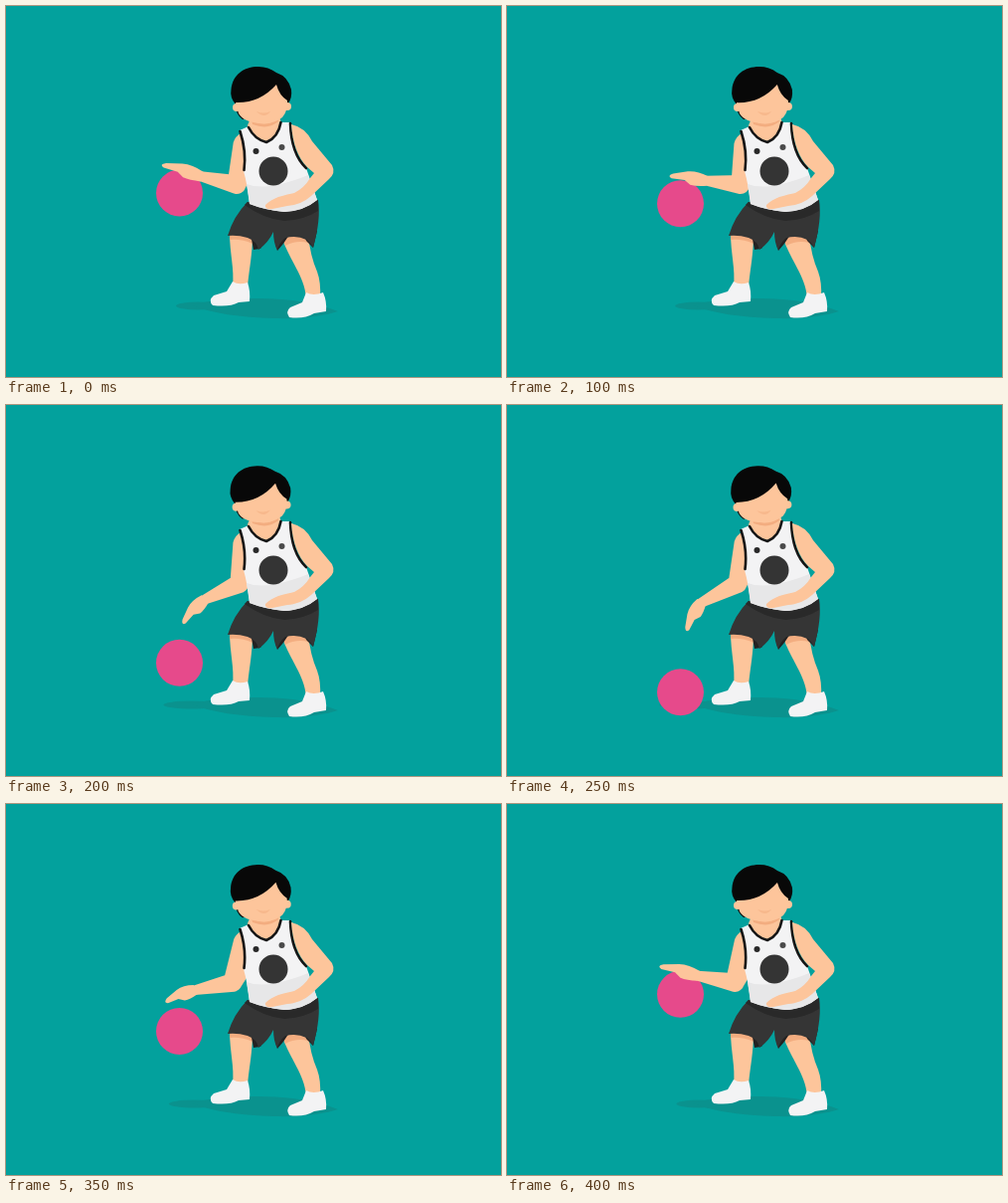
An HTML page that plays this animation: 498 px wide and 373 px high, repeating every 450 ms.

```html
<!DOCTYPE html>
<html lang="en">
<head>
<meta charset="utf-8">
<title>Dribbling player</title>
<style>
  html, body { margin: 0; width: 100%; height: 100%; overflow: hidden; background: #03a19d; }
  svg { display: block; width: 100%; height: 100%; }
  .skin { fill: #fdc59b; }
  .shade { fill: #f3ad80; }
  .shoe { fill: #f3f3f4; }
  .trim { fill: none; stroke: #151515; stroke-width: 2.6; stroke-linecap: round; }
</style>
</head>
<body>
<svg viewBox="0 0 498 373">
  <g fill="#0a928e">
    <ellipse id="ballShadow" cy="301.5" ry="4"/>
    <path d="M187 301C205 295 228 294 254 294C286 294 315 299 334 307C322 311 299 315 270 314C235 313 207 309 187 301Z"/>
  </g>

  <circle id="ball" cx="174.5" r="23.5" fill="#e64a8b"/>
  <path id="arm" class="skin"/>
  <path id="hand" class="skin" d="M-2 5Q9 9 18 7L32 3Q38 0 33 -2L20 -2L14 -6Q8 -7 -2 -5Z"/>

  <g id="legs">
    <path class="skin" d="M225 228L248 230C248 249 245 262 243 282H228C230 264 225 249 225 228Z"/>
    <path class="skin" d="M278 234L304 230Q306 251 313 267Q317 278 316 293H302C300 271 286 257 278 234Z"/>
    <path class="shade" d="M225 229L248 233V239Q237 234 225 235Z"/>
    <path class="shade" d="M278 233L302 229L304 238Q292 235 281 241Z"/>
    <path class="shoe" d="M228 277Q234 281 243 278Q246 286 245 297L234 298Q225 303 208 301Q203 296 209 291L222 287Z"/>
    <path class="shoe" d="M302 288Q309 292 319 288Q323 297 322 307L310 309Q300 315 285 313Q281 307 286 303L298 298Z"/>
  </g>

  <g id="shorts">
    <path fill="#222" d="M245 224L270 222L256 244L249 245ZM270 222L285 230L279 239L273 246ZM298 226H313L309 243L302 236Z"/>
    <path fill="#353535" d="M243 197L314 195Q317 214 309 243Q302 229 281 233Q274 239 273 246Q269 238 269 227Q264 238 254 245Q252 236 243 233Q233 230 223 231Q229 211 243 197Z"/>
    <path fill="#292929" d="M243 197L314 195V206Q300 215 280 216Q259 214 240 200Z"/>
  </g>

  <path class="skin" d="M243 120L248 108H274L277 118Q273 133 262 136Q249 133 243 122Z"/>
  <path class="shade" d="M247 115Q261 123 274 113V116Q264 125 248 119Z"/>

  <path fill="#f3f3f4" d="M235 125L244 121Q250 134 262 137Q274 132 276 117L285 117Q288 148 302 163L313 195Q300 206 280 207Q260 205 245 199Q243 180 239 166Q242 145 235 125Z"/>
  <path fill="#e7e7e8" d="M242 179Q262 187 304 170L313 195Q300 206 280 207Q260 205 245 199Z"/>
  <path class="trim" d="M235.500 126Q242 146 239.500 165M286 118Q287 149 302 163"/>
  <path class="trim" d="M244 122Q250 134 262 137Q274 132 276.500 117"/>
  <circle cx="269" cy="166" r="14.500" fill="#343434"/>
  <circle cx="251.500" cy="146" r="3" fill="#292929"/>
  <circle cx="277.500" cy="142" r="3" fill="#4a4a4a"/>

  <path class="skin" d="M287 119Q301 122 308 136L328 160Q332 168 325 174L307 191Q297 200 283 201L268 204Q260 205 261 200Q266 195 274 192Q284 189 290 188Q300 183 306 173L310 168L303 162Q289 148 287 119Z"/>

  <g id="head">
    <path fill="#080808" d="M238 114Q231 109 231 99Q225 92 226.500 84C228 69 239 61 254 61Q264 61 272 67Q284 71 287 84Q288 92 284 98L276 106Z"/>
    <circle class="skin" cx="232" cy="102" r="4"/>
    <circle class="skin" cx="283" cy="101" r="4"/>
    <path class="skin" d="M231 97Q255 98 272 79Q275 90 283 95Q284 105 278 112Q269 119 257 118Q239 117 234 108Z"/>
    <path class="shade" opacity=".55" d="M252 106Q259 109 266 106Q260 114 252 106Z"/>
  </g>
</svg>
<script>
  const get = id => document.getElementById(id);
  const [ball, shadow, arm, hand, head] = ['ball', 'ballShadow', 'arm', 'hand', 'head'].map(get);

  const HOLD = 100, STEP = 50, LOOP = 450, POSES = 8;
  const SHOULDER = [244, 142];
  const SHADOW_RIGHT = 215;

  // Limb segment: two discs joined by straight sides
  function taper([ax, ay], ra, [bx, by], rb) {
    const angle = Math.atan2(by - ay, bx - ax);
    const nx = -Math.sin(angle), ny = Math.cos(angle);
    const at = (x, y, r) => `${x + nx * r} ${y + ny * r}`;
    return `M${at(ax, ay, ra)}A${ra} ${ra} 0 0 1 ${at(ax, ay, -ra)}` +
      `L${at(bx, by, -rb)}A${rb} ${rb} 0 0 1 ${at(bx, by, rb)}Z`;
  }

  function drawArm(drop, swing) {
    const reach = Math.sin(drop * Math.PI / 2);
    const elbow = [232 + 4 * swing, 179.5];
    const wrist = [195 + 6 * swing, 171 + 28 * reach];
    const tip = [157 + 24 * drop + 6 * swing, 160 + 67 * reach];
    const dx = tip[0] - wrist[0], dy = tip[1] - wrist[1];
    const angle = Math.atan2(dy, dx) * 180 / Math.PI;

    arm.setAttribute('d', taper(SHOULDER, 16, elbow, 9.5) + taper(elbow, 9.5, wrist, 4.8));
    hand.setAttribute('transform',
      `translate(${wrist}) rotate(${angle}) scale(${Math.hypot(dx, dy) / 35} 1)`);
  }

  function draw(now) {
    const t = now % LOOP;
    const pose = Math.max(0, Math.floor((t - HOLD) / STEP) + 1);

    // The ball rises faster than it falls
    const phase = Math.max(0.33 * pose, 0.5 * pose - 0.54);
    const drop = Math.sin(phase) ** 2;
    const swing = Math.sin(2 * Math.PI * pose / POSES);
    const shadowLeft = 171 - 18 * drop;

    ball.setAttribute('cy', 188 + 102 * drop);
    shadow.setAttribute('cx', (shadowLeft + SHADOW_RIGHT) / 2);
    shadow.setAttribute('rx', (SHADOW_RIGHT - shadowLeft) / 2);
    head.setAttribute('transform', `rotate(${-2 * drop} 260 118)`);
    drawArm(drop, swing);
  }

  function loop(now) {
    draw(now);
    requestAnimationFrame(loop);
  }
  draw(0);
  requestAnimationFrame(loop);
</script>
</body>
</html>
```
